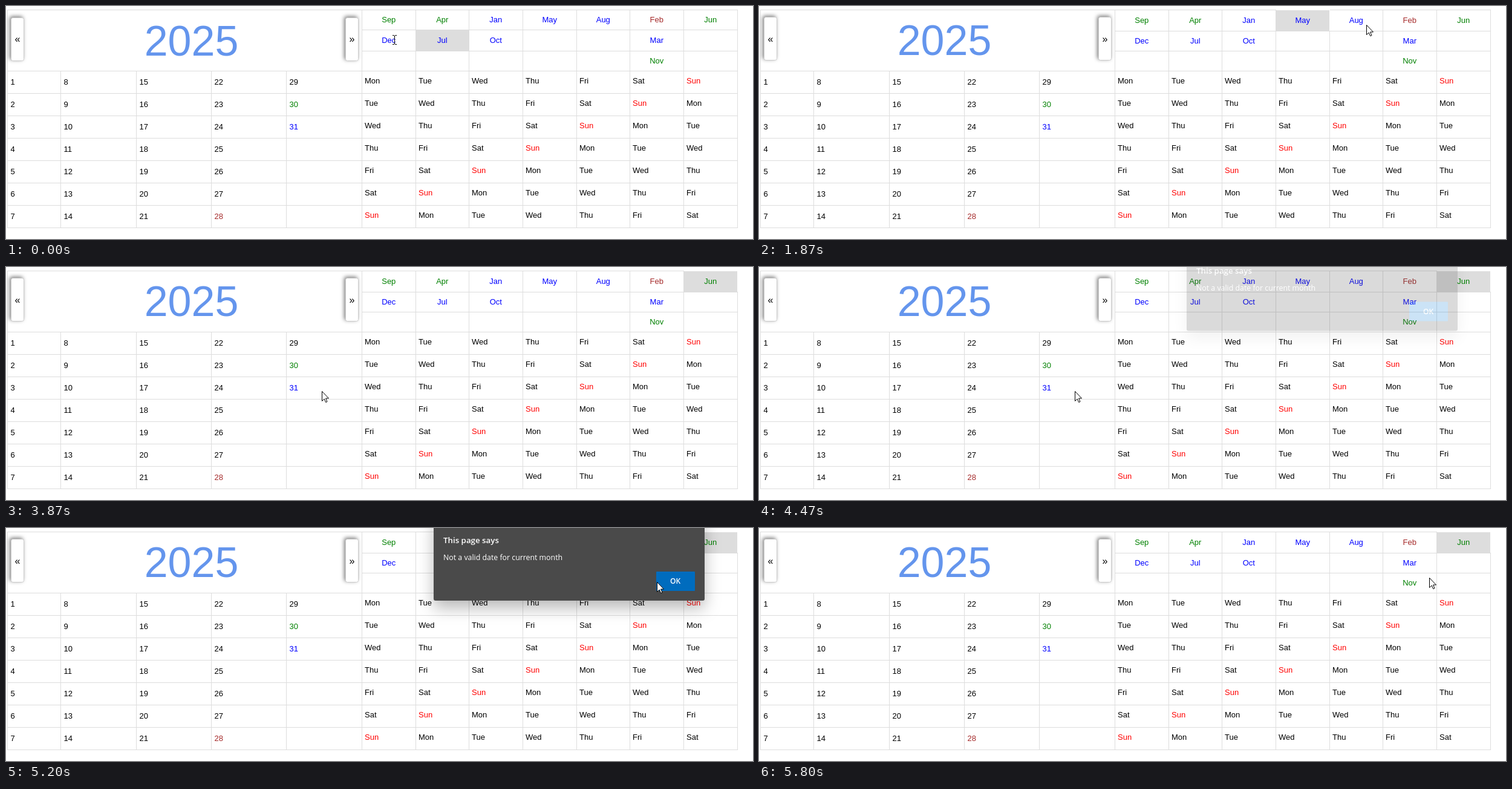
An HTML page that plays this animation: 1235 px wide and 385 px high, repeating every 7540 ms.

```html
<!DOCTYPE html>
<html lang="en">
<head>
<meta charset="utf-8">
<title>One-page calendar</title>
<style>
  html, body { margin: 0; width: 100%; height: 100%; overflow: hidden; background: #fff; }
  svg { display: block; width: 1235px; height: 385px; font: 13px "Liberation Sans", Arial, sans-serif; }
  .year { font-size: 70px; fill: cornflowerblue; }
  .nav { fill: #fff; stroke: #ccc; filter: drop-shadow(-2px -2px 3px rgba(0, 0, 0, .5)); }
  .nav-text { font-size: 16px; }
  .grid { fill: none; stroke: #ddd; }
  .mid { text-anchor: middle; }
  #dialog { font: 12.35px "Open Sans", "Noto Sans", sans-serif; fill: #fff; }
  #dialog .panel { fill: #4a4a4a; filter: drop-shadow(0 12px 13px rgba(0, 0, 0, .28)); }
  #dialog .title { font-size: 13.3px; font-weight: 600; }
  #dialog .ok { font-size: 12px; font-weight: 600; }
  #arrow { fill: #fff; stroke: #000; }
  #beam { fill: none; stroke: #000; }
</style>
</head>
<body>
<svg viewBox="0 0 1235 385">
  <g id="board"></g>
  <g id="dialog">
    <rect class="panel" x="707" y="-20" width="448" height="140" rx="3"/>
    <text class="title" x="723" y="25">This page says</text>
    <text x="723" y="53">Not a valid date for current month</text>
    <rect id="button" x="1075" y="72" width="64" height="32" rx="1"/>
    <text class="ok mid" x="1106.5" y="92">OK</text>
  </g>
  <path id="arrow" d="M.5 .5V16.5L4.2 13L6.7 18.6L9 17.6L6.6 12H11.5Z"/>
  <path id="beam" d="M-3 -7.5H-1L.5 -6.5L2 -7.5H4M.5 -6.5V6.5M-3 7.5H-1L.5 6.5L2 7.5H4"/>
</svg>
<script>
const LOOP = 7540, TICK = 1000 / 15;
const COLS = [2, 90, 215, 339, 463, 588, 677, 765, 854, 943, 1031, 1120, 1209];
const FIRST = 5;                      // index of the first weekday column
const BODY = 107, ROW = 37, BOTTOM = 366;
const WEEKDAYS = ['Mon', 'Tue', 'Wed', 'Thu', 'Fri', 'Sat', 'Sun'];
const MONTHS = [
  ['Sep', 'Apr', 'Jan', 'May', 'Aug', 'Feb', 'Jun'],
  ['Dec', 'Jul', 'Oct', '', '', 'Mar', ''],
  ['', '', '', '', '', 'Nov', '']
];
const monthColor = m => m === 'Feb' ? 'brown' : /Sep|Apr|Jun|Nov/.test(m) ? 'green' : 'blue';
const dateColor = d => ({ 28: 'brown', 30: 'green', 31: 'blue' })[d] || '#000';

// Everything below is keyed by tick (1/15 s).
const SELECTED = [[0, 'Jul'], [5, 'Dec'], [23, 'May'], [39, 'Jun']];
const POINTER = [
  [8, 642, 56], [9, 655, 46], [12, 780, 30], [15, 896, 22], [17, 923, 20],
  [25, 923, 20], [30, 1058, 39], [33, 1153, 33], [35, 1176, 27],
  [43, 1176, 27], [45, 1140, 22], [47, 1000, 62], [50, 725, 150], [52, 580, 194], [54, 526, 208],
  [56, 526, 208], [58, 522, 205],
  [73, 522, 205], [75, 730, 168], [78, 1076, 89], [84, 1108, 82]
];
const FADE = { 67: [.2, -14.5], 68: [.55, -6], 69: [.85, -2], 86: [.45, -6] };

const $ = id => document.getElementById(id);
const text = (x, y, s, cls = '', fill = '#000') =>
  `<text x="${x}" y="${y}" class="${cls}"${cls === 'year' || cls === 'year mid' ? '' : ` fill="${fill}"`}>${s}</text>`;
const rect = (x, y, w, h, fill) => `<rect x="${x}" y="${y}" width="${w}" height="${h}" fill="${fill}"/>`;
const hLine = (y, x) => `M${x} ${y + .5}H1210`;
const vLine = (x, y) => `M${x + .5} ${y}V${BOTTOM + 1}`;

function drawBoard(selected) {
  const inTopRow = MONTHS[0].includes(selected);
  const shift = inTopRow ? 1 : 0;     // a selected cell makes its row taller
  const tops = [6, inTopRow ? 41 : 39, 74, BODY];
  let out = '', lines = hLine(6, 2) + hLine(tops[1], 588) + hLine(74, 588);

  for (let y = BODY; y <= BOTTOM; y += ROW) lines += hLine(y, 2);
  COLS.forEach((x, i) => lines += vLine(x, i && i < FIRST ? BODY : 6));
  out += `<path class="grid" d="${lines}"/>`;

  MONTHS.forEach((row, r) => row.forEach((month, c) => {
    const x = COLS[FIRST + c], w = COLS[FIRST + c + 1] - x;
    if (month && month === selected) {
      if (!r) out += rect(x + 1, 6, w, tops[1] - 6, '#fff');
      out += rect(x, r ? tops[r] : 7, w, tops[r + 1] - tops[r] + (r ? 1 : 0), '#ddd');
    }
    if (month) out += text(x + w / 2 + .3, 27 + 34 * r + (r < 2 ? shift : 0), month, 'mid', monthColor(month));
  }));

  for (let d = 1; d <= 31; d++) {
    const col = Math.floor((d - 1) / 7), row = (d - 1) % 7;
    out += text(COLS[col] + 5.5, 130 + ROW * row, d, '', dateColor(d));
  }
  for (let r = 0; r < 7; r++) for (let c = 0; c < 7; c++) {
    const day = WEEKDAYS[(r + c) % 7];
    out += text(COLS[FIRST + c] + 5, 128 + ROW * r, day, '', day === 'Sun' ? 'red' : '#000');
  }

  out += text(306.5, 82 - shift, 2025, 'year mid');
  [[8, '«'], [561, '»']].forEach(([x, glyph]) => {
    out += `<rect class="nav" x="${x + .5}" y="${19.5 - shift}" width="21" height="71" rx="3"/>`;
    out += text(x + 11, 60, glyph, 'nav-text mid');
  });
  return out;
}

function pointerAt(tick) {
  const next = POINTER.findIndex(p => p[0] >= tick);
  if (next <= 0) return (next ? POINTER[POINTER.length - 1] : POINTER[0]).slice(1);
  const [t0, x0, y0] = POINTER[next - 1], [t1, x1, y1] = POINTER[next];
  const k = (tick - t0) / (t1 - t0);
  return [Math.round(x0 + (x1 - x0) * k), Math.round(y0 + (y1 - y0) * k)];
}

let shown;
function render(now) {
  const tick = Math.floor((now % LOOP + 3.4) / TICK);
  const selected = SELECTED.filter(s => s[0] <= tick).pop()[1];
  if (selected !== shown) $('board').innerHTML = drawBoard(shown = selected);

  const [x, y] = pointerAt(tick), overText = tick < 9;
  $('arrow').style.display = overText ? 'none' : '';
  $('beam').style.display = overText ? '' : 'none';
  $(overText ? 'beam' : 'arrow').setAttribute('transform', `translate(${x} ${y})`);

  const [opacity, dy] = FADE[tick] || [tick >= 70 && tick < 86 ? 1 : 0, 0];
  $('dialog').style.display = opacity ? '' : 'none';
  $('dialog').setAttribute('opacity', opacity);
  $('dialog').setAttribute('transform', `translate(0 ${dy})`);
  $('button').setAttribute('fill', x >= 1075 ? '#006cbe' : '#0078d4');
}

const start = performance.now();
function loop() {
  render(performance.now() - start);
  requestAnimationFrame(loop);
}
loop();
</script>
</body>
</html>
```
